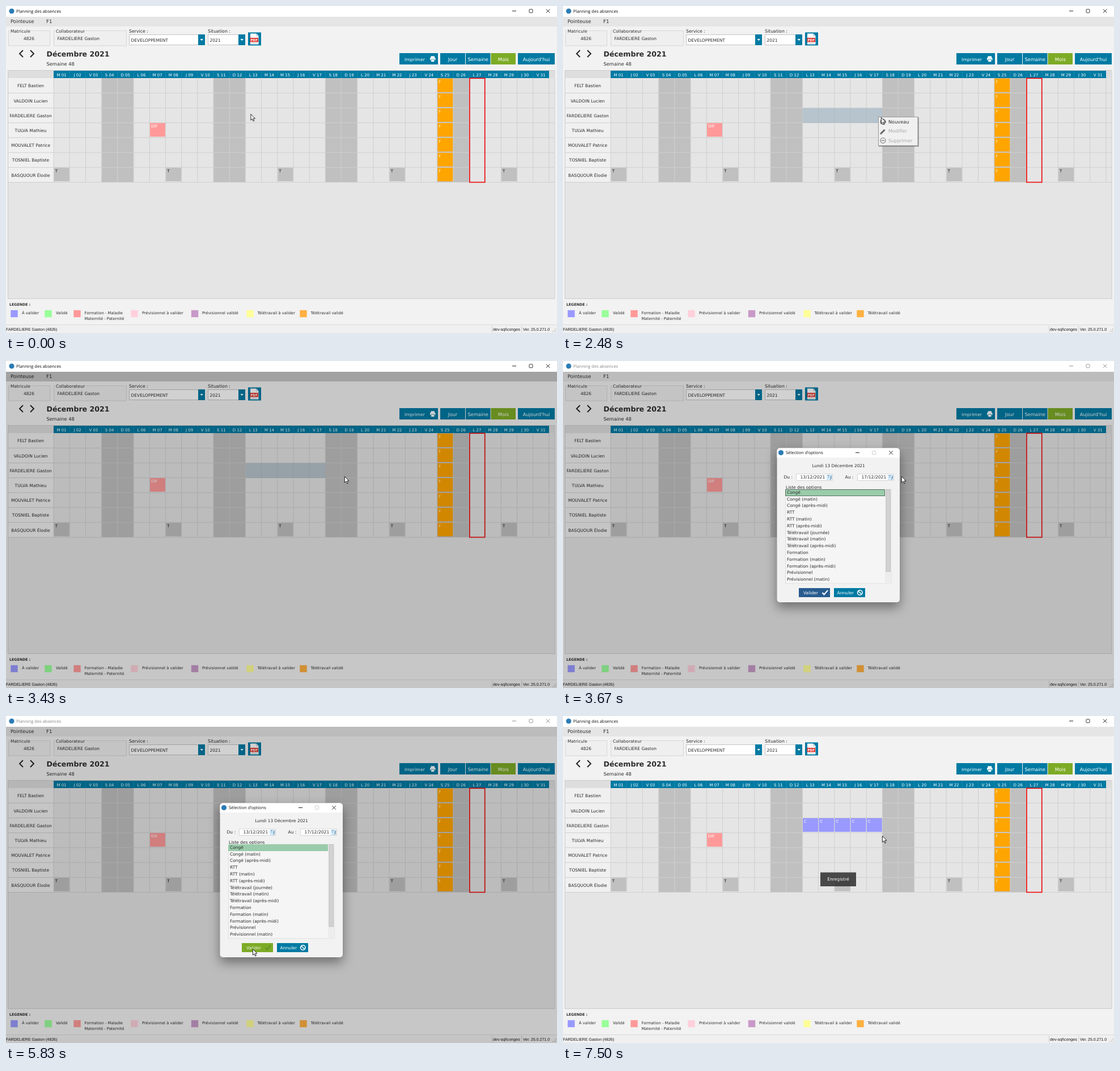
These frames come from a looping animation (972 by 576 pixels, 7900 ms). An HTML page:

```html
<!DOCTYPE html>
<html lang="fr">
<head>
<meta charset="utf-8">
<title>Planning des absences</title>
<style>
html, body { margin: 0; width: 100%; height: 100%; overflow: hidden; background: #f2f2f2; }
svg { display: block; width: 100%; height: 100%; text-rendering: geometricPrecision; }
text { font-family: "DejaVu Sans", Verdana, sans-serif; white-space: pre; }
.ui { font-family: "Open Sans", "Noto Sans", sans-serif; }
.status { font-family: "Liberation Sans", Arial, sans-serif; }
#dialog { filter: drop-shadow(0 9px 10px rgba(0,0,0,.42)); }
#menu { filter: drop-shadow(1.6px 1.6px .6px rgba(0,0,0,.45)); }
</style>
</head>
<body>
<svg id="stage" viewBox="0 0 972 576" xmlns="http://www.w3.org/2000/svg"></svg>
<script>
const LOOP = 7900;
const BLUE = '#007aa3', GREEN = '#7dab26', INK = '#2c2c2c', LINE = '#cfcfcf';
const LEFT = 84, TOP = 127, COL = 28.19, ROW = 26.2;

const rect = (x, y, w, h, fill, extra = '') =>
  `<rect x="${x}" y="${y}" width="${w}" height="${h}" fill="${fill}" ${extra}/>`;
const text = (x, y, s, size = 7.5, fill = INK, extra = '') =>
  `<text x="${x}" y="${y}" font-size="${size}" fill="${fill}" ${extra}>${s}</text>`;
const mid = (x, y, s, size, fill, extra = '') =>
  text(x, y, s, size, fill, 'text-anchor="middle" ' + extra);
const path = (d, stroke, width = 1, extra = '') =>
  `<path d="${d}" fill="none" stroke="${stroke}" stroke-width="${width}" ${extra}/>`;
const dot = (x, y, r, fill, extra = '') =>
  `<circle cx="${x}" cy="${y}" r="${r}" fill="${fill}" ${extra}/>`;
const group = (id, body, extra = '') => `<g id="${id}" ${extra}>${body}</g>`;

const colX = i => LEFT + COL * i;
const rowY = r => TOP + ROW * r;

const people = ['FELT Bastien', 'VALDOIN Lucien', 'FARDELIERE Gaston', 'TULVA Mathieu',
  'MOUVALET Patrice', 'TOSNIEL Baptiste', 'BASQUOUR Élodie'];

function cell(col, row, fill, label, ink) {
  const x = colX(col) + .8, y = rowY(row) + .6;
  return rect(x, y, 26.9, 24, fill) + text(x + 2, y + 8.2, label, 7, ink);
}

// Minimise, maximise and close marks of a window, x being the left end of the first
function controls(x, y, ink, maxInk, step) {
  const m = x + step, c = x + 2 * step;
  return path(`M${x} ${y}h7`, ink) +
    `<rect x="${m}" y="${y - 3}" width="6" height="6" rx="1" fill="none" stroke="${maxInk}" stroke-width=".9"/>` +
    path(`M${c} ${y - 3.2}l6.4 6.4m0-6.4l-6.4 6.4`, ink);
}

function titleBar() {
  return rect(0, 0, 972, 19, '#fff') + dot(10, 9, 4.6, '#2b7cb5') +
    group('caption', text(18, 12, 'Planning des absences', 7.5, '#111', 'class="ui"') +
      controls(893, 8.8, '#222', '#222', 30)) +
    rect(0, 19, 972, 17, '#e5e5e5') +
    text(8, 30.3, 'Pointeuse', 8.5) + text(71, 30.3, 'F1', 8.5);
}

function combo(x, w, label, value) {
  return text(x, 47.3, label, 7.8) +
    rect(x + .5, 50.5, w, 18, '#fff', 'stroke="#c4c4c4"') +
    text(x + 3.5, 62.5, value, 7.5) +
    rect(x + w, 50, 12, 19, BLUE) +
    `<path d="M${x + w + 3.5} 58h5.4l-2.7 3.2z" fill="#fff"/>`;
}

function field(x, w, label) {
  return rect(x + .5, 43.5, w, 26.5, '#efefef', 'stroke="#d6d6d6"') +
    rect(x + 3, 42, label.length * 4.1, 4, '#f2f2f2') + text(x + 4, 47.3, label, 7.5);
}

function button(x, w, label, fill = BLUE, size = 8.4, shift = 0) {
  return rect(x, 83, w, 20, fill) + mid(x + w / 2 + shift, 96.5, label, size, '#fff');
}

function toolbar() {
  const pdf = rect(427, 46.5, 23, 23, BLUE) +
    '<path d="M431 48.5h10.5l4 4v15h-14.5z" fill="#fff"/>' +
    path('M441.5 48.5v4h4', '#9db9c4', .8) +
    rect(430.5, 56, 14.5, 7.5, '#e23b32') +
    mid(437.8, 62, 'PDF', 5.6, '#fff', 'font-weight="bold"') +
    path('M433 65.5h10', '#bbb', .8);
  const printer = rect(749.5, 88.3, 6.5, 3, '#fff') + rect(748, 91, 9.5, 4.5, '#fff', 'rx="1"') +
    rect(749.8, 94, 6, 4.5, '#fff', `stroke="${BLUE}" stroke-width=".7"`);
  return field(4, 73, 'Matricule') + mid(40.5, 60, '4826', 7.5) +
    field(84, 128, 'Collaborateur') + text(90.5, 60, people[2]) +
    combo(217, 122, 'Service :', 'DEVELOPPEMENT') + combo(356, 54, 'Situation :', '2021') + pdf +
    path('M30 78l-6 6 6 6M43 78l6 6-6 6', '#222', 1.9) +
    text(71.5, 88.5, 'Décembre 2021', 12.55, INK, 'font-weight="bold"') +
    text(71.5, 105, 'Semaine 48', 8.3) +
    button(694, 68, 'Imprimer', BLUE, 7.8, -7) + printer +
    button(766, 44, 'Jour') + button(811, 43.5, 'Semaine') +
    button(855.5, 43.5, 'Mois', GREEN) + button(903, 65, "Aujourd'hui");
}

function planner() {
  let s = rect(3.5, 113.5, 964.5, 402, '#e5e5e5', 'stroke="#cbcbcb"') +
    rect(4, 114, 80, 13, '#dedede') + rect(958, 114, 10, 13, '#dedede') +
    rect(4, TOP, 80, 184, '#f0f0f0') + rect(LEFT, 114, 874, 13, BLUE);
  for (let i = 0; i < 31; i++) {
    const x = colX(i), day = (i + 2) % 7;
    if (day > 4) s += rect(x, TOP, COL, 184, '#c0c0c0');
    s += mid(x + 14, 123.5, 'LMMJVSD'[day] + ' ' + String(i + 1).padStart(2, '0'), 7, '#fff');
    if (i) s += rect(x - .3, 114, 1, 13, '#1d88ac');
  }
  for (let i = 0; i < 32; i++) s += rect(colX(i) - .4, TOP, 1, 184, LINE);
  people.forEach((name, r) => {
    s += rect(4, rowY(r + 1) - .4, 964, 1, LINE) + mid(43.5, rowY(r) + 16.3, name, 7.5);
    s += cell(24, r, '#ffa500', 'F', '#fff0c8');
  });
  for (let i = 0; i < 31; i += 7) s += cell(i, 6, '#c0c0c0', 'T', '#111');
  s += cell(6, 3, '#ff9999', 'DIF', '#fff');
  let leave = '';
  for (let i = 12; i < 17; i++) leave += cell(i, 2, '#9999ff', 'C', '#fff');
  return s + group('leave', leave) +
    rect(colX(12) + .4, 180, 0, 26, 'rgb(156,177,190)', 'id="pick" fill-opacity=".62"') +
    rect(817.9, 127.3, 26.8, 183.2, 'none', 'stroke="#ee1111" stroke-width="1.7"');
}

function legend() {
  const items = [[8, 28, '#9999ff', 'À valider'], [68, 88, '#99ff99', 'Validé'],
    [119, 138.5, '#ff9999', 'Formation - Maladie'], [220, 240, '#ffd0dc', 'Prévisionnel à valider'],
    [326.5, 346, '#c899c8', 'Prévisionnel validé'], [424, 443.5, '#ffff99', 'Télétravail à valider'],
    [518, 537.5, '#ffb040', 'Télétravail validé']];
  return text(6, 528, 'LEGENDE :', 6.3, INK, 'font-weight="bold"') +
    items.map(([x, tx, c, s]) => rect(x + .3, 535.8, 12.4, 12.4, c) +
      text(tx, 543.3, s, 6.8)).join('') +
    text(138.5, 552.8, 'Maternité - Paternité', 6.8);
}

function statusBar() {
  let s = rect(0, 561, 972, 15, '#f0f0f0') + rect(0, 561, 972, 1, '#dadada') +
    rect(857, 563, 1, 12, '#d0d0d0') + rect(909, 563, 1, 12, '#d0d0d0') +
    text(0, 571.8, people[2] + ' (4826)', 7, '#111', 'class="status"') +
    text(859, 571.8, 'dev-sql\\conges', 7.1, '#111', 'class="status"') +
    text(912, 571.8, 'Ver. 25.0.271.0', 7, '#111', 'class="status"');
  for (let i = 0; i < 3; i++)
    for (let j = 0; j <= i; j++) s += rect(969 - 2.5 * j, 568 + 2.5 * i, 1.2, 1.2, '#b0b0b0');
  return s;
}

function contextMenu() {
  const off = '#a9a9a9';
  return rect(556.5, 195.5, 69.5, 50.5, '#f0f0f0', 'stroke="#979797"') +
    rect(557.5, 196.5, 67.5, 15.5, '#dcdcdc', 'id="hover"') +
    dot(564.5, 204, 4.6, 'none', 'stroke="#444"') + path('M562 204h5m-2.5-2.5v5', '#444') +
    path('M560.5 225l7-7', '#666', 3) + path('M559.5 226l2-2', '#666', 1.3) +
    dot(564.5, 237, 4.6, 'none', 'stroke="#666"') + path('M562 237h5', '#666', 1.2) +
    text(574, 207, 'Nouveau', 8.2) + text(574, 223, 'Modifier', 8.2, off) +
    text(574, 239.8, 'Supprimer', 8.1, off);
}

function dateField(x, value) {
  return rect(x + .5, 199, 64, 11.5, '#fff', 'stroke="#d0d0d0" stroke-width=".8"') +
    text(x + 7.5, 207.4, value, 7.6) +
    rect(x + 54, 200, 10, 10, '#d3eafa') +
    path(`M${x + 56} 202h3m3 0v5l-2 2M${x + 57} 205h1m2 0h1`, '#44617a', .9);
}

function dialog() {
  const three = s => [s, s + ' (matin)', s + ' (après-midi)'];
  const options = [...three('Congé'), ...three('RTT'), 'Télétravail (journée)',
    ...three('Télétravail').slice(1), ...three('Formation'), ...three('Prévisionnel').slice(0, 2)];
  return rect(377.5, 153.5, 216.5, 271.5, '#f2f2f2', 'rx="5"') +
    '<path d="M377.5 170v-11.5a5 5 0 0 1 5-5h206.5a5 5 0 0 1 5 5V170z" fill="#fff"/>' +
    dot(384.5, 161.5, 4.6, '#2b7cb5') +
    text(393, 164.3, "Sélection d'options", 7.5, '#111', 'class="ui"') +
    controls(516, 161.5, '#222', '#c8c8c8', 29.7) +
    mid(486, 186.5, 'Lundi 13 Décembre 2021', 7.4) +
    text(389.5, 207.4, 'Du :') + dateField(411, '13/12/2021') +
    text(497.5, 207.4, 'Au :') + dateField(519, '17/12/2021') +
    text(393, 224.5, 'Liste des options') +
    rect(392.5, 226, 187, 166, '#f5f5f5', 'stroke="#d9d9d9" stroke-width=".8"') +
    rect(568, 226, 11.5, 166, '#ededed') +
    rect(570, 226.5, 7.5, 144.5, '#d2d2d2', 'stroke="#b8b8b8" stroke-width=".8"') +
    rect(392, 226, 176, 12, '#9accab') +
    rect(392.5, 226.5, 175, 11, 'none', 'id="focus" stroke="#4f6b58" stroke-width=".9"') +
    options.map((s, i) => text(395, 233.8 + 11.8 * i, s)).join('') +
    rect(416, 400, 55, 16, '#285c8e', 'id="ok"') +
    group('okMark', text(424, 411, 'Valider', 7.6, '#fff') +
      path('M457.5 408l3 3.5 6.5-7.5', '#fff', 2, 'id="check"')) +
    rect(478, 400, 55, 16, BLUE) + text(483.5, 411, 'Annuler', 7.6, '#fff') +
    dot(523.8, 408, 4.2, 'none', 'stroke="#fff" stroke-width="1.6"') +
    path('M521 405.2l5.6 5.6', '#fff', 1.5);
}

const toast = rect(454, 275.5, 63, 24.5, '#333', 'fill-opacity=".88"') +
  mid(485.5, 290.3, 'Enregistré', 7.6, '#fff');
const arrow = '<path d="M.4.4v10.8l2.5-2.3 1.8 4 1.7-.8-1.8-3.9h3.4z" fill="#fff" stroke="#111" stroke-width=".9"/>';
const cross = path('M-7.5 0h15M0-7.5v15', '#fff', 2) + path('M-7.5 0h15M0-7.5v15', '#222', 1);

document.getElementById('stage').innerHTML =
  rect(0, 0, 972, 576, '#f2f2f2') + titleBar() + toolbar() + planner() + legend() + statusBar() +
  rect(0, 19, 972, 17, '#000', 'id="menuDim"') + rect(0, 19, 972, 557, '#000', 'id="dim"') +
  group('toast', toast) + group('menu', contextMenu()) + group('dialog', dialog()) +
  group('pointer', group('arrow', arrow) + group('cross', cross));

const el = {};
document.querySelectorAll('[id]').forEach(n => el[n.id] = n);

const ramp = (t, a, b) => Math.min(1, Math.max(0, (t - a) / (b - a)));
const easeIn = u => u ** 1.5, easeOut = u => 1 - (1 - u) ** 1.5;
const smooth = u => u * u * (3 - 2 * u), line = u => u;
const show = (n, on) => n.setAttribute('display', on ? 'inline' : 'none');
const fade = (n, v) => { show(n, v > 0); n.setAttribute('opacity', v); };

// Pointer moves: start, end, destination, easing
const moves = [
  [100, 110, 431, 190, line], [280, 1050, 532, 195, smooth], [1080, 1490, 556, 195, easeOut],
  [2440, 2480, 561, 196, line], [2480, 2990, 597, 203, smooth],
  [3700, 4060, 548, 231, easeIn], [4060, 4890, 436, 401, easeOut], [4900, 5180, 435, 410, easeOut],
  [6300, 6500, 451, 376, easeIn], [6500, 7010, 563, 211, easeOut]];

function pointerAt(t) {
  let x = 431.5, y = 190;
  for (const [a, b, tx, ty, ease] of moves) {
    const u = ease(ramp(t, a, b));
    x += (tx - x) * u;
    y += (ty - y) * u;
  }
  return [x, y];
}

function draw(t) {
  const [x, y] = pointerAt(t);
  el.pointer.setAttribute('transform', `translate(${x.toFixed(2)} ${y.toFixed(2)})`);
  const drag = t >= 280 && t < 1940;
  show(el.cross, drag);
  show(el.arrow, !drag);

  const last = drag ? Math.min(16, Math.floor((x - LEFT) / COL)) : 16;
  show(el.pick, t >= 280 && t < 7420);
  el.pick.setAttribute('width', COL * (last - 11));

  fade(el.menu, ramp(t, 1920, 2200) * (1 - ramp(t, 3290, 3370)));
  show(el.hover, t >= 2520);

  const dim = t < 5950 ? ramp(t, 3300, 3420) : 0;
  fade(el.dim, .18 * dim);
  fade(el.menuDim, t < 3510 ? .14 * dim : 0);
  el.caption.setAttribute('opacity', t >= 3510 && t < 5950 ? .5 : 1);

  const open = ramp(t, 3470, 3640) * (1 - ramp(t, 5870, 5950));
  const k = .94 + .06 * easeOut(open);
  fade(el.dialog, open);
  el.dialog.setAttribute('transform', `translate(${486 * (1 - k)} ${289 * (1 - k)}) scale(${k})`);
  const pressed = t >= 5700;
  show(el.focus, !pressed);
  el.ok.setAttribute('fill', pressed ? GREEN : '#285c8e');
  el.okMark.setAttribute('opacity', pressed ? .85 : 1);
  el.check.setAttribute('stroke', pressed ? '#5f8a2a' : '#fff');

  show(el.leave, t >= 5990);
  show(el.toast, t >= 6060);
}

const start = performance.now();
function tick() {
  draw((performance.now() - start) % LOOP);
  requestAnimationFrame(tick);
}
tick();
</script>
</body>
</html>
```
